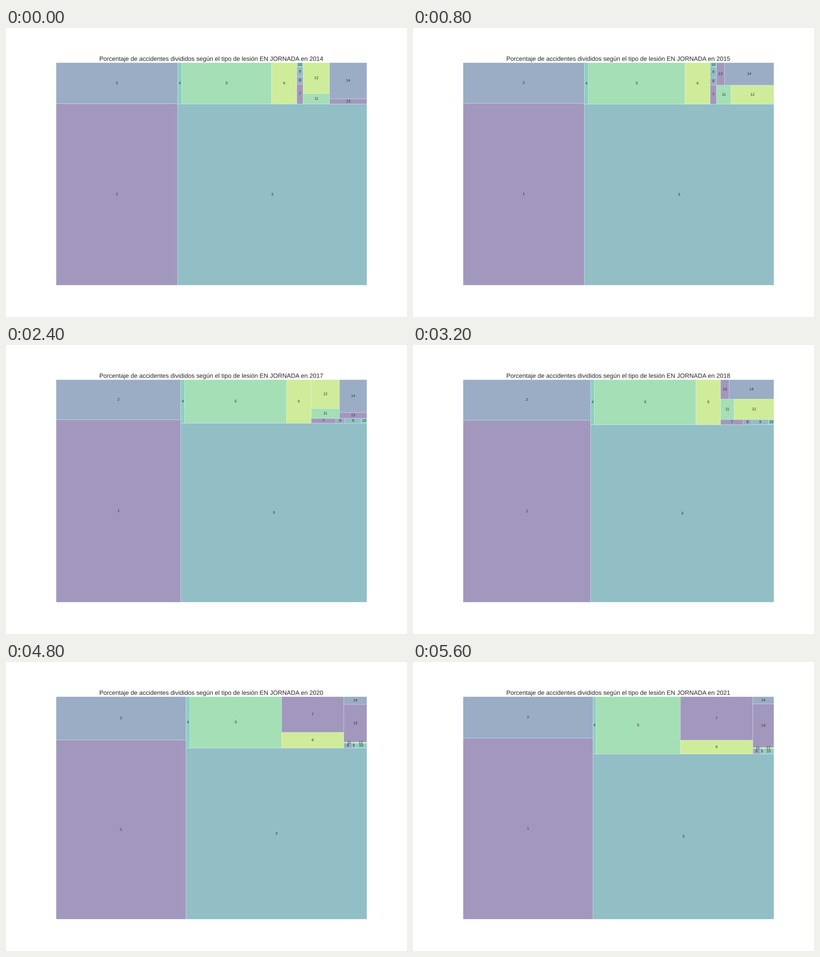
Recreate the animation shown at these times as a matplotlib script. Size 881 px wide and 636 px high, loop 6.4 s.

```python
import matplotlib.pyplot as plt
import numpy as np
from matplotlib.animation import FuncAnimation
from matplotlib.patches import Rectangle
from matplotlib.patheffects import Normal

DPI = 64
WIDTH, HEIGHT = 881, 636
PT = WIDTH / 18 / DPI  # sizes are designed for an 18 inch wide page
FIRST, LAST = 2014, 2021

plt.rcParams["font.family"] = "Liberation Sans"
plt.rcParams["text.hinting"] = "no_hinting"

COLORS = plt.get_cmap("viridis")(np.linspace(0, 1, 8)[1:-1])
# Drawing glyphs as outlines keeps their sub-pixel position
TEXT = dict(color="0.15", path_effects=[Normal()], snap=False)


def shares(year):
    """Percent of accidents per injury type, following each type's trend."""
    if year < 2020:
        t = (year - FIRST) / 5
        late = max(0, 1.5 * t - 0.5)
        early = 1 - (1 - t) ** 3
        return [31.89 + 2.31 * late, 7.2 - 0.9 * t + 1.5 * t * t,
                49.57 - 3.7 * late, 0.25,
                5.35 + 0.55 * early + 0.87 * t, 1.51 + 0.12 * late,
                0.18 - 0.015 * t, 0.07 - 0.01 * t, 0.089 + 0.045 * t, 0.038,
                0.4, 1.175, 0.28 - 0.045 * early, 1.95 - 0.7 * early]
    # From 2020 on the types are counted in a new way
    t = year - 2020
    return [33.66 + 0.33 * t, 8.11 - 0.33 * t, 44.8 - 1.56 * t,
            0.3 - 0.04 * t, 6.8 + 0.18 * t, 1.405 + 0.04 * t,
            3.21 + 1.35 * t, 0.0586, 0.0215, 0.081, 0.0174, 0.02,
            1.264 + 0.065 * t, 0.254 - 0.037 * t]


def strip(areas, x, y, dx, dy):
    """Stack areas along the shorter side of the free region."""
    cells = []
    if dx >= dy:
        w = sum(areas) / dy
        for a in areas:
            cells.append((x, y, w, a / w))
            y += a / w
    else:
        h = sum(areas) / dx
        for a in areas:
            cells.append((x, y, a / h, h))
            x += a / h
    return cells


def worst_ratio(areas, *region):
    return max(max(w / h, h / w) for _, _, w, h in strip(areas, *region))


def treemap(areas, x=0, y=0, dx=100, dy=100):
    """Squarified layout that keeps the given order."""
    cells = []
    while areas:
        region = (x, y, dx, dy)
        n = 1
        while (n < len(areas) and worst_ratio(areas[:n], *region)
               >= worst_ratio(areas[:n + 1], *region)):
            n += 1
        row = strip(areas[:n], *region)
        cells += row
        if dx >= dy:
            x, dx = x + row[0][2], dx - row[0][2]
        else:
            y, dy = y + row[0][3], dy - row[0][3]
        areas = areas[n:]
    return cells


def draw(i):
    year = FIRST + i
    parts = np.array(shares(year))
    areas = list(parts * 1e4 / parts.sum())
    ax.clear()
    ax.set(xlim=(0, 100), ylim=(0, 100))
    ax.axis("off")
    for k, (x, y, w, h) in enumerate(treemap(areas)):
        ax.add_patch(Rectangle((x, y), w, h, fc=COLORS[k % 6], ec="white",
                               lw=PT, alpha=0.5, snap=False))
        ax.text(x + w / 2, y + h / 2, str(k + 1), fontsize=12 * PT,
                ha="center", va="center", **TEXT)
    ax.set_title("Porcentaje de accidentes divididos según el tipo de lesión "
                 f"EN JORNADA en {year}", fontsize=20 * PT, pad=6 * PT, **TEXT)
    return []


fig = plt.figure(figsize=(WIDTH / DPI, HEIGHT / DPI), dpi=DPI,
                 facecolor="white")
ax = fig.add_axes([0.125, 0.11, 0.775, 0.77])
anim = FuncAnimation(fig, draw, frames=LAST - FIRST + 1, interval=800,
                     init_func=lambda: draw(0), repeat=True, repeat_delay=0)
plt.show()
```
